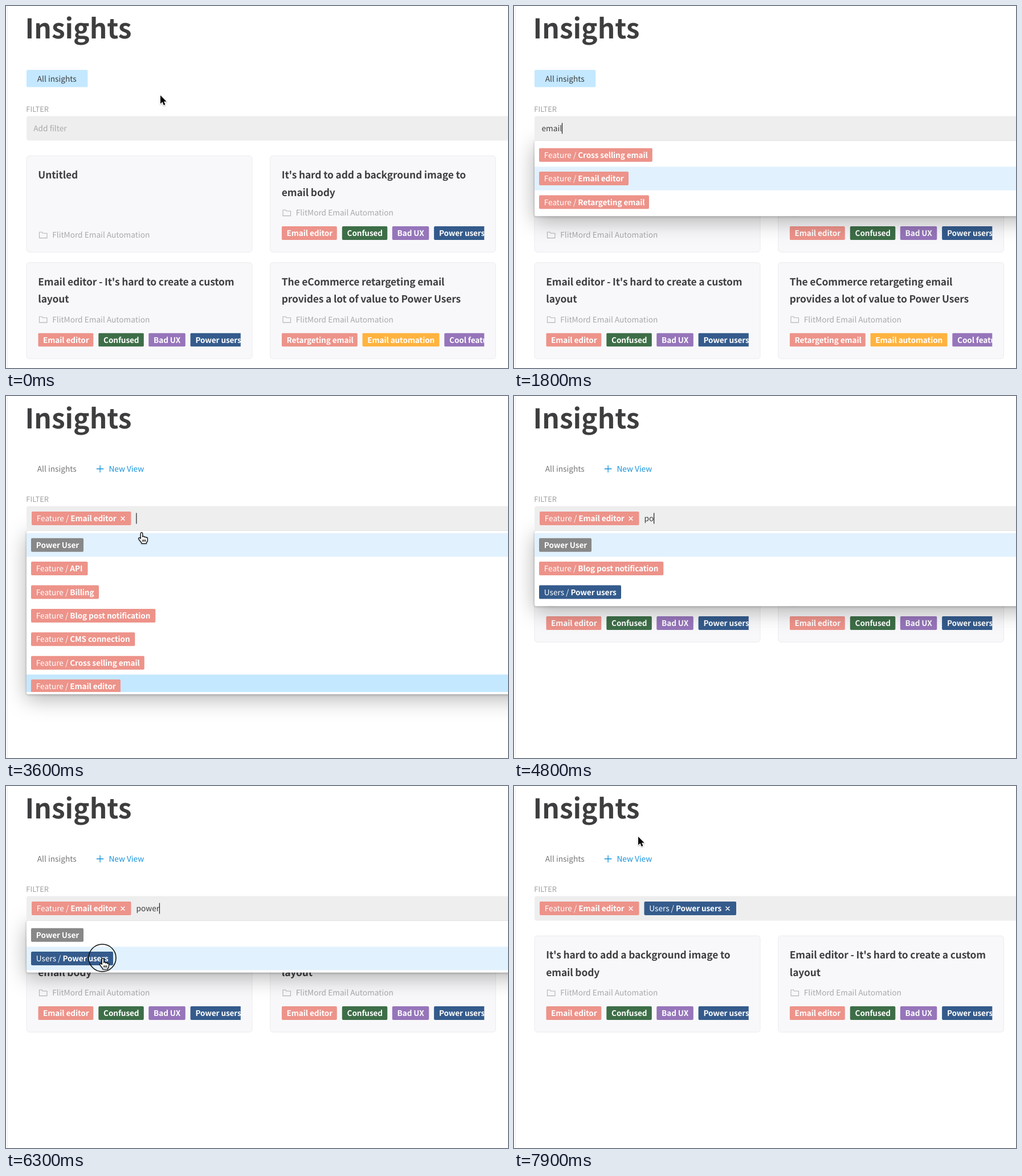
An HTML page that plays this animation: 881x636 px, repeating every 8 s.

```html
<!DOCTYPE html>
<html lang="en">
<head>
<meta charset="utf-8">
<title>Insights filter</title>
<style>
html, body { margin: 0; width: 100%; height: 100%; overflow: hidden; background: #fff; }
svg { display: block; }
text {
  font: 13.7px "Noto Sans CJK JP", "Noto Sans CJK SC", "Noto Sans CJK", sans-serif;
  fill: #3e3e40; white-space: pre; text-rendering: geometricPrecision;
}
.b { font-weight: 700; letter-spacing: -.008em; }
.chip { font-size: 13.6px; fill: #fff; }
.h1 { font-size: 47.8px; font-weight: 700; }
.title { font-size: 17.4px; }
.label { font-size: 12.9px; fill: #a0a0a2; }
.muted { fill: #a9a9ac; }
.tab { fill: #77777a; }
.link { fill: #1693dc; }
.menu { fill: #fff; filter: drop-shadow(0 1px 2px rgba(0,0,0,.25)) drop-shadow(0 8px 18px rgba(0,0,0,.3)); }
#mouse { filter: drop-shadow(0 1px 1px rgba(0,0,0,.3)); }
.line { fill: none; stroke-linecap: round; stroke-linejoin: round; }
</style>
</head>
<body>
<svg width="881" height="636" viewBox="0 0 881 636">
  <g id="page"></g>
  <circle id="ring" r="24" fill="none" stroke="#111" stroke-width="1.6"/>
  <g id="mouse">
    <path id="arrow" d="M0 0V14.8L3.5 11.6L5.9 17.2L8.4 16.1L6 10.7H10.6Z" fill="#000" stroke="#fff" stroke-width="2" paint-order="stroke" stroke-linejoin="round"/>
    <g id="beam" class="line">
      <path d="M-4 -8.5Q0 -8.5 0 -6Q0 -8.5 4 -8.5M0 -6V6M-4 8.5Q0 8.5 0 6Q0 8.5 4 8.5M-2 3H2" stroke="#fff" stroke-width="3"/>
      <path d="M-4 -8.5Q0 -8.5 0 -6Q0 -8.5 4 -8.5M0 -6V6M-4 8.5Q0 8.5 0 6Q0 8.5 4 8.5M-2 3H2" stroke="#111" stroke-width="1.3"/>
    </g>
    <g id="hand" stroke="#000" stroke-width="1.2" stroke-linejoin="round">
      <path fill="#fff" d="M-1.7 1.6a1.7 1.7 0 0 1 3.4 0V7.5a1.6 1.6 0 0 1 3.1 0V8.3a1.5 1.5 0 0 1 2.9 0V9.3a1.4 1.4 0 0 1 2.7 .2V13q0 3-2 4.8V19H-.2V17.6Q-2.6 15-5 11.3a1.5 1.5 0 0 1 2.4-1.8L-1.7 10.6Z"/>
      <path fill="none" d="M2 12.3v3.6M4.3 12.3v3.6M6.6 12.3v3.6"/>
    </g>
  </g>
</svg>
<script>
const LOOP = 8000, TICK = 100, ROW = 41.4, LIST_TOP = 241, LIST_MAX = 279;
const SALMON = '#ed938a', GREEN = '#3d6e47', PURPLE = '#9675ba', BLUE = '#345b8c', ORANGE = '#ffb340', GRAY = '#888';
const $ = id => document.getElementById(id);

// Markup helpers
const rect = (x, y, w, h, fill, r = 0, more = '') =>
  `<rect x="${x}" y="${y}" width="${w}" height="${h}" rx="${r}" fill="${fill}" ${more}/>`;
const text = (x, y, cls, str) => `<text x="${x}" y="${y}" class="${cls}">${str}</text>`;
const path = (d, color, w) => `<path class="line" d="${d}" stroke="${color}" stroke-width="${w}"/>`;
const clip = (x, y, w, h, body) => `<svg x="${x}" y="${y}" width="${w}" height="${h}">${body}</svg>`;

function chip(x, y, w, color, group, name) {
  const prefix = group ? `${group} / ` : '';
  return rect(x, y, w, 24, color, 2) +
    text(x + 8.8, y + 17.1, 'chip', `${prefix}<tspan class="b">${name}</tspan>`);
}

// Filter options: group, name, colour, chip width
const feature = (name, w) => ['Feature', name, SALMON, w];
const OPTIONS = {
  user: ['', 'Power User', GRAY, 92],
  api: feature('API', 99.5),
  billing: feature('Billing', 119),
  blog: feature('Blog post notification', 218.3),
  cms: feature('CMS connection', 182.3),
  cross: feature('Cross selling email', 198.8),
  editor: feature('Email editor', 157),
  retarget: feature('Retargeting email', 193),
  power: ['Users', 'Power users', BLUE, 144]
};
const FULL = ['user', 'api', 'billing', 'blog', 'cms', 'cross', 'editor'];

// Card tags: name, colour, offset, width
const COMMON = [['Email editor', SALMON, 0, 97], ['Confused', GREEN, 106, 79.5],
  ['Bad UX', PURPLE, 194, 64.5], ['Power users', BLUE, 267.3, 97]];
const RETARGET = [['Retargeting email', SALMON, 0, 133], ['Email automation', ORANGE, 141.7, 135],
  ['Cool feature', PURPLE, 285.5, 97]];
const UNTITLED = [['Untitled'], []];
const IMAGE = [["It's hard to add a background image to", 'email body'], COMMON];
const LAYOUT = [["Email editor - It's hard to create a custom", 'layout'], COMMON];
const VALUE = [['The eCommerce retargeting email', 'provides a lot of value to Power Users'], RETARGET];

function card([lines, tags], i) {
  const x = 36 + (i % 2) * 427.5, y = 263.3 + (i >> 1) * 187.5;
  const fy = y + (tags.length ? 100 : 139);
  return rect(x, y, 396, 169, '#f8f8fa', 5, 'stroke="#ececef"') +
    lines.map((s, n) => text(x + 20.3, y + 39.7 + n * 30.6, 'b title', s)).join('') +
    path(`M${x + 22.5} ${fy - 5}h4.6l1.6 2h7.3v8.3h-13.5z`, '#b4b4b8', 1.1) +
    text(x + 45.2, fy + 5.1, 'muted', 'FlitMord Email Automation') +
    clip(x + 20.3, y + 123.7, 355.5, 24, tags.map(([s, c, dx, w]) => chip(dx, 0, w, c, '', s)).join(''));
}

function menu({ list, focus, picked }) {
  const h = Math.min(list.length * ROW, LIST_MAX);
  const rows = list.map((key, i) => {
    const [group, name, color, w] = OPTIONS[key], y = i * ROW;
    const back = key === picked ? '#c4e8ff' : key === focus ? '#e1f1fe' : '';
    return (back && rect(0, y, 846, ROW, back)) + chip(8, y + 8.7, w, color, group, name);
  });
  return `<rect class="menu" x="36" y="237" width="1000" height="${h + 8}" rx="3"/>` +
    clip(36, LIST_TOP, 846, h, rows.join(''));
}

function selected(n) {
  const cross = x => path(`M${x - 3} 212.3l6 6m0 -6l-6 6`, '#fff', 1.5);
  return (n > 0 ? chip(45, 203, 174.5, SALMON, 'Feature', 'Email editor') + cross(205) : '') +
    (n > 1 ? chip(228.5, 203, 161.5, BLUE, 'Users', 'Power users') + cross(375) : '');
}

// Each step changes only what it names
const STEPS = [
  [0, { cards: [UNTITLED, IMAGE, LAYOUT, VALUE], tags: 0, typed: '', caret: 0, list: null, focus: '', picked: '' }],
  [700, { list: FULL, focus: 'editor', caret: 1 }],
  [1300, { typed: 'e' }],
  [1500, { typed: 'em', list: ['cross', 'editor', 'retarget'] }],
  [1600, { typed: 'ema' }],
  [1700, { typed: 'emai' }],
  [1800, { typed: 'email' }],
  [1900, { typed: 'email ' }],
  [2000, { typed: 'email e', list: ['editor'] }],
  [2100, { typed: 'email ed' }],
  [2200, { typed: 'email edi' }],
  [2700, { caret: 0 }],
  [3200, { caret: 1 }],
  [3600, { tags: 1, typed: '', list: FULL, focus: 'user', picked: 'editor', cards: [] }],
  [4000, { cards: [IMAGE, LAYOUT] }],
  [4200, { caret: 0 }],
  [4700, { typed: 'p', caret: 1, list: ['user', 'api', 'blog', 'power'] }],
  [4800, { typed: 'po', list: ['user', 'blog', 'power'] }],
  [5000, { typed: 'pow', list: ['user', 'power'] }],
  [5100, { typed: 'powe' }],
  [5300, { typed: 'power' }],
  [5800, { caret: 0 }],
  [6000, { focus: 'power' }],
  [6300, { caret: 1 }],
  [6400, { tags: 2, typed: '', list: FULL, focus: 'api' }],
  [6600, { focus: 'blog' }],
  [6700, { focus: '' }],
  [6900, { caret: 0 }],
  [7200, { list: null }]
];

// Pointer path: time, x, y
const MOVES = [[0, 271, 157], [100, 271, 157], [500, 284, 213], [2600, 284, 213], [2700, 230, 218], [2900, 230, 218],
  [3300, 238, 240], [5700, 238, 241], [6100, 170, 303], [6500, 170, 303], [6900, 201, 626], [7400, 201, 626],
  [7900, 218, 89]];
const HIDDEN = [[1300, 2700], [4700, 5700]];
const CLICKS = [[600, 800], [3400, 3600], [6200, 6400], [6900, 7200]];
const within = (spans, t) => spans.some(([a, b]) => t >= a && t < b);

function pointer(t) {
  const i = MOVES.findIndex(m => m[0] > t);
  if (i < 0) return MOVES[MOVES.length - 1].slice(1);
  const [t0, x0, y0] = MOVES[i - 1], [t1, x1, y1] = MOVES[i];
  const p = (t - t0) / (t1 - t0), e = p * p * (3 - 2 * p);
  return [x0 + (x1 - x0) * e, y0 + (y1 - y0) * e];
}

function drawPage(s) {
  const saved = s.tags > 0, x = [48.5, 228.5, 399][s.tags];
  $('page').innerHTML =
    rect(2, 0, 1, 636, '#ededee') +
    text(33.5, 57, 'h1', 'Insights') +
    (saved
      ? text(54.8, 133.1, 'tab', 'All insights') + path('M159.3 128h11.6m-5.8 -5.8v11.6', '#1693dc', 1.3) +
        text(180.4, 133.1, 'link', 'New View')
      : rect(36, 112.3, 107.3, 30.3, '#c4e8ff', 2) + text(54.8, 133.1, '', 'All insights')) +
    text(35.3, 186.2, 'label', 'FILTER') +
    s.cards.map(card).join('') +
    (s.list ? menu(s) : '') +
    rect(36, 193.5, 1000, 43, '#eeeeee', 4) +
    selected(s.tags) +
    (saved || s.typed ? '' : text(48.3, 220.2, 'muted', 'Add filter')) +
    `<text id="typed" x="${x}" y="220.2">${s.typed}</text>`;
  if (s.caret) {
    const end = x + (s.typed ? $('typed').getComputedTextLength() : 0) + .4;
    $('page').insertAdjacentHTML('beforeend', rect(end - .6, 205.5, 1.2, 19, '#222'));
  }
}

function drawPointer(t, s) {
  const [x, y] = pointer(t);
  const overCard = !s.list && s.cards.length && y > 263 && y < 432;
  const overMenu = s.list && y > 237 && y < 524;
  const kind = y > 193 && y <= 237 ? 'beam' : overMenu || overCard ? 'hand' : 'arrow';
  for (const k of ['arrow', 'beam', 'hand']) $(k).style.display = k === kind ? '' : 'none';
  $('mouse').style.display = within(HIDDEN, t) ? 'none' : '';
  $('mouse').setAttribute('transform', `translate(${x} ${y})`);
  $('ring').style.display = within(CLICKS, t) ? '' : 'none';
  $('ring').setAttribute('transform', `translate(${x - 1} ${y - 1})`);
}

const start = performance.now();
let state, lastStep = -1, lastTick = -1;

function frame() {
  const t = Math.floor((performance.now() - start) % LOOP / TICK) * TICK;
  if (t !== lastTick) {
    lastTick = t;
    const step = STEPS.filter(s => s[0] <= t).length;
    if (step !== lastStep) {
      lastStep = step;
      state = Object.assign({}, ...STEPS.slice(0, step).map(s => s[1]));
      drawPage(state);
    }
    drawPointer(t, state);
  }
  requestAnimationFrame(frame);
}
frame();
</script>
</body>
</html>
```
